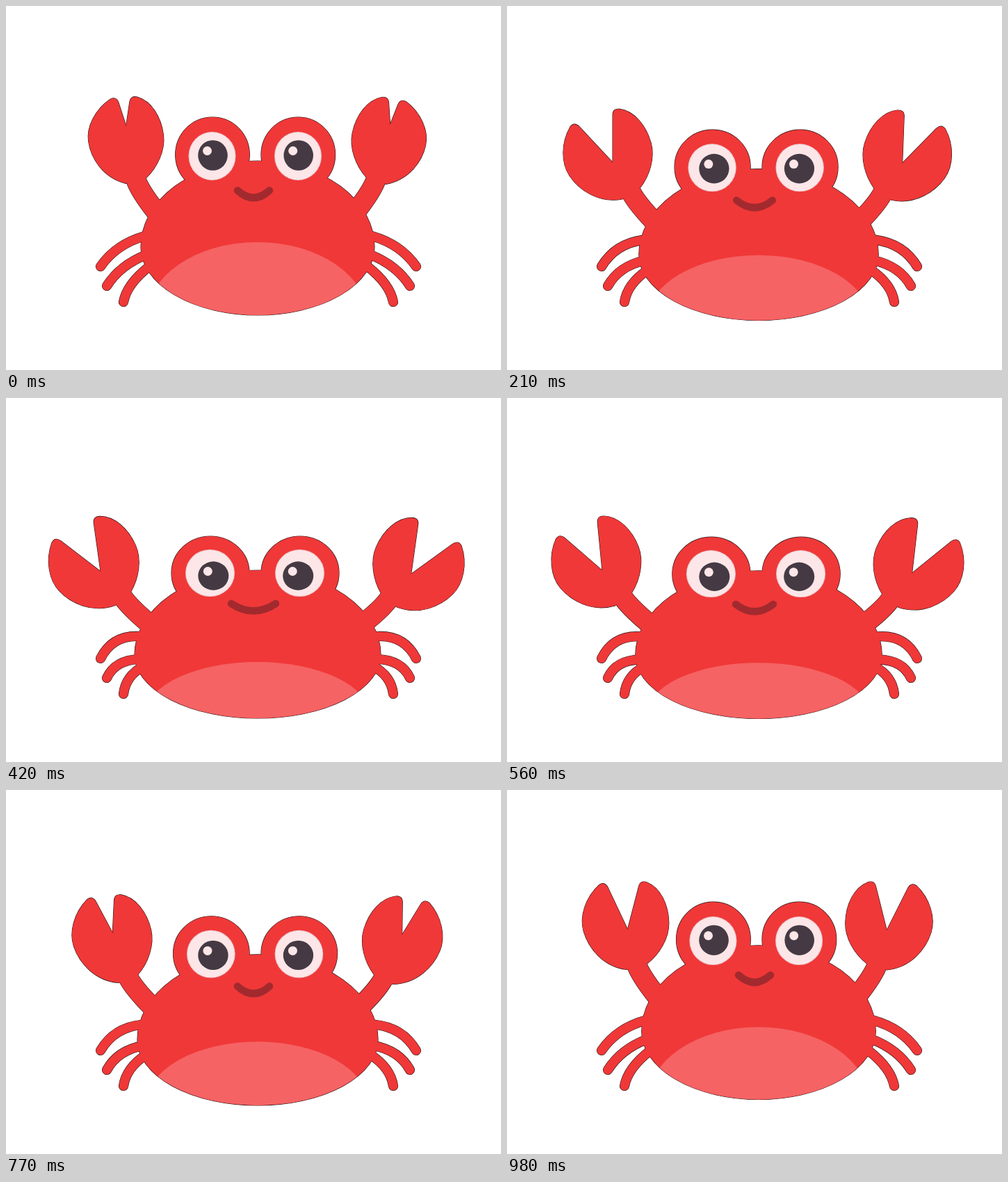
Write an HTML page with a canvas that moves like this. It is 712 px wide and 524 px high and loops after 1050 ms.

```html
<!DOCTYPE html>
<html lang="en">
<head>
<meta charset="utf-8">
<title>Waving crab</title>
<style>
  html, body { margin: 0; width: 100%; height: 100%; overflow: hidden; background: #fff; }
  canvas { display: block; }
</style>
</head>
<body>
<canvas id="stage" width="712" height="524"></canvas>
<script>
const ctx = document.getElementById('stage').getContext('2d');
const STEP = 70, STEPS = 15;
const RED = '#f03838', EDGE = '#2a1416', BELLY = '#f66364';
const EYE = '#fce6e8', PUPIL = '#453a43', MOUTH = '#a22a2e';

// Key poses over the loop, in steps of 70 ms
const KEYS = [0, 2, 4, 6, 8, 10, 12, 14];
const TRACKS = {
  drop:       [0, .25, .69, 1, 1.03, .78, .33, .03],
  smile:      [23, 23, 29, 32, 27, 23.5, 23, 23],
  leftInner:  [9.5, 12.9, 22.9, 25.9, 23.5, 16.6, 13.5, 3.4],
  leftOuter:  [8.5, 26.4, 39.6, 43.4, 40, 29.8, 10.1, 16.2],
  rightInner: [14.2, 16.5, 23.7, 25.9, 24.5, 19.4, 17, 3.9],
  rightOuter: [12, 28.8, 40.3, 45, 42, 33.4, 13, 17.5]
};

// Jaws are drawn upright, hinged on the wrist at 0,0
const INNER_JAW = new Path2D('M-14-44L9-115Q12-124 21-120C40-111 50-86 49-60C48-38 33-16 14-3L-10 0Z');
const OUTER_JAW = new Path2D('M3-46L-9-121Q-11-131-20-128C-44-116-60-92-60-70C-60-46-48-14-16 0L10 0Z');

// Each leg: foot, then bend and hip when the body is up and when it is down
const LEGS = [
  { foot: [136, 375], up: [158, 343, 200, 331], down: [153, 341, 192, 343] },
  { foot: [145, 403], up: [164, 373, 202, 358], down: [157, 377, 192, 376] },
  { foot: [169, 426], up: [174, 400, 206, 375], down: [172, 400, 198, 386] }
];

const mix = (a, b, k) => a + (b - a) * k;

// Smooth cyclic curve through the key values
function sample(values, t) {
  const n = KEYS.length;
  const time = i => KEYS[(i + n) % n] + STEPS * Math.floor(i / n);
  const value = i => values[(i + n) % n];
  const slope = i => (value(i + 1) - value(i - 1)) / (time(i + 1) - time(i - 1));
  let i = n - 1;
  while (KEYS[i] > t) i--;
  const h = time(i + 1) - time(i), u = (t - time(i)) / h;
  const u2 = u * u, u3 = u2 * u;
  return value(i) * (2 * u3 - 3 * u2 + 1) + value(i + 1) * (3 * u2 - 2 * u3)
    + h * (slope(i) * (u3 - 2 * u2 + u) + slope(i + 1) * (u3 - u2));
}

function oval(x, y, rx, ry, color) {
  ctx.beginPath();
  ctx.ellipse(x, y, rx, ry, 0, 0, Math.PI * 2);
  if (color) {
    ctx.fillStyle = color;
    ctx.fill();
  }
}

function curve(x0, y0, cx, cy, x1, y1, width) {
  ctx.beginPath();
  ctx.moveTo(x0, y0);
  ctx.quadraticCurveTo(cx, cy, x1, y1);
  ctx.lineWidth = width;
  ctx.stroke();
}

function bodyPath(d) {
  const x = 362, y = mix(347, 370, d), rx = mix(168, 177, d);
  ctx.beginPath();
  ctx.ellipse(x, y, rx, mix(124, 122, d), 0, Math.PI, Math.PI * 2);
  ctx.ellipse(x, y, rx, mix(98, 91, d), 0, 0, Math.PI);
  ctx.closePath();
}

function mirrored(width, draw) {
  ctx.save();
  ctx.translate(width, 0);
  ctx.scale(-1, 1);
  draw();
  ctx.restore();
}

function paint(grow, path) {
  path ? ctx.fill(path) : ctx.fill();
  if (!grow) return;
  ctx.lineWidth = grow * 2;
  path ? ctx.stroke(path) : ctx.stroke();
}

function legs(d, grow) {
  for (const { foot, up, down } of LEGS) {
    curve(...foot, ...up.map((v, i) => mix(v, down[i], d)), 13 + grow * 2);
  }
}

function jaw(path, x, y, angle, stretch, grow) {
  ctx.save();
  ctx.translate(x, y);
  ctx.rotate(-angle * Math.PI / 180);
  ctx.scale(1, stretch);
  paint(grow, path);
  ctx.restore();
}

function claw(d, inner, outer, sink, grow) {
  const x = mix(188, 168.5, d), y = mix(253, 287.5 + sink, d);
  const stretch = Math.max(.9, Math.min(1, .97 + .008 * (outer - inner)));
  curve(x, y, x + 8 + 3.5 * d, y + 19 - 3 * d, mix(223, 211, d), mix(305, 329, d), 28 + grow * 2);
  jaw(INNER_JAW, x, y, inner, 1, grow);
  jaw(OUTER_JAW, x, y, outer, stretch, grow);
}

function silhouette(p, color, grow) {
  const d = p.drop;
  ctx.fillStyle = ctx.strokeStyle = color;
  legs(d, grow);
  mirrored(726, () => legs(d, grow));
  claw(d, p.leftInner, p.leftOuter, 0, grow);
  mirrored(719, () => claw(d, p.rightInner, p.rightOuter, 2, grow));
  bodyPath(d);
  paint(grow);
  for (const x of [mix(297, 294, d), mix(420.3, 423, d)]) {
    oval(x, mix(214, 252, d), mix(53.3, 56, d), mix(54, 53, d));
    paint(grow);
  }
}

function eye(x, pupilX, d) {
  const y = mix(216, 252, d), pupilY = y - 1 + 5 * d;
  oval(x, y, mix(34, 35.5, d), mix(35, 34, d), '#ecc4c8');
  oval(x, y, mix(33, 34.5, d), mix(34, 33, d), EYE);
  oval(pupilX, pupilY, mix(21.3, 22, d), mix(21.8, 20.7, d), PUPIL);
  oval(pupilX - 8, pupilY - 6.5, 6.5, 6.5, EYE);
}

function draw(t) {
  const p = {};
  for (const name in TRACKS) p[name] = sample(TRACKS[name], t);
  const d = p.drop;

  ctx.fillStyle = '#fff';
  ctx.fillRect(0, 0, 712, 524);
  ctx.lineCap = ctx.lineJoin = 'round';
  silhouette(p, EDGE, .6);
  silhouette(p, RED, 0);

  ctx.save();
  bodyPath(d);
  ctx.clip();
  const ry = mix(110, 75, d);
  oval(361.5, mix(340, 380, d) + ry, 160, ry, BELLY);
  ctx.restore();

  eye(mix(296.5, 293.5, d), mix(297.5, 298.3, d), d);
  eye(mix(420, 422.5, d), mix(420.7, 420.2, d), d);

  const y = mix(265.5, 296, d);
  ctx.strokeStyle = MOUTH;
  curve(356 - p.smile, y, 356, y + 21, 356 + p.smile, y, 10.5);
}

function frame() {
  draw(Math.floor(performance.now() / STEP) % STEPS);
  requestAnimationFrame(frame);
}
frame();
</script>
</body>
</html>
```
